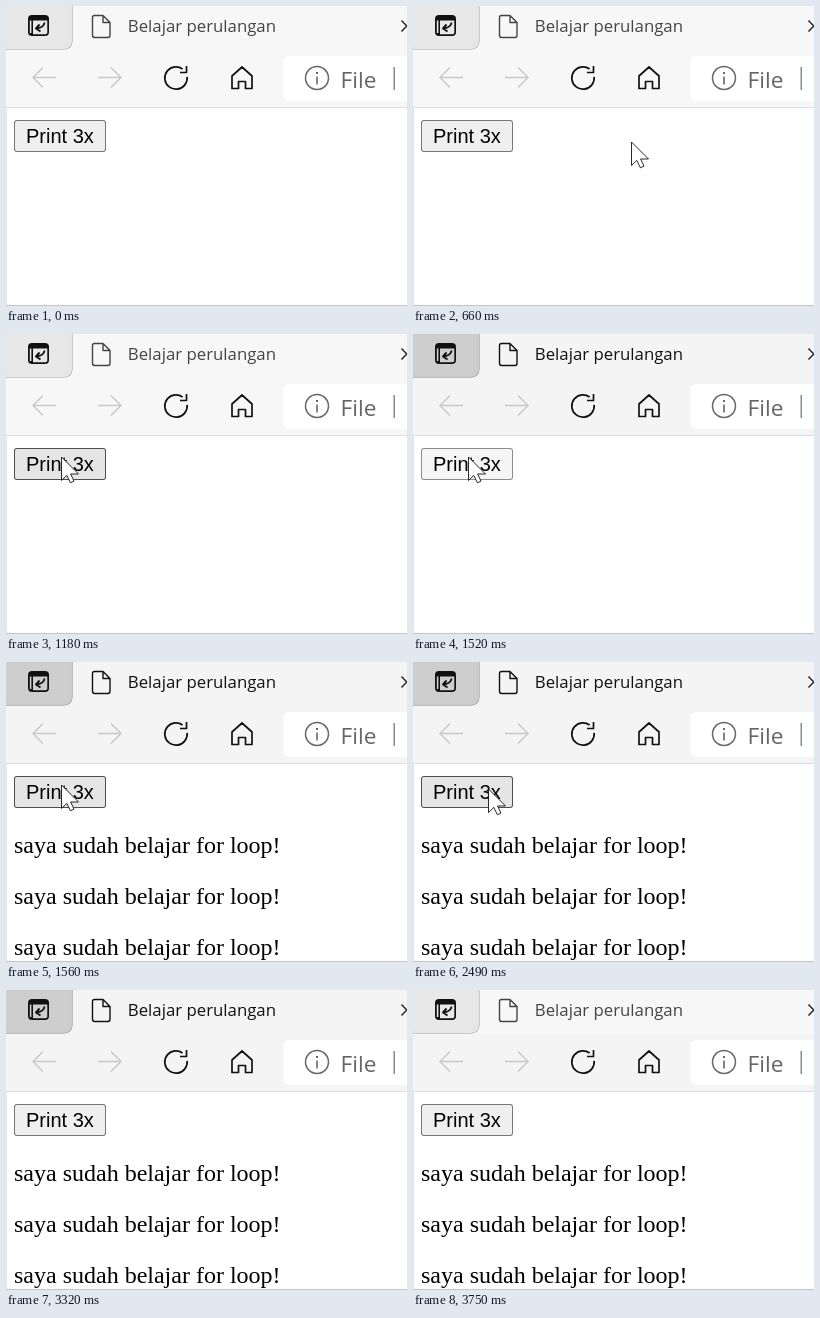
Write an HTML page with a canvas that moves like this. It is 401x300 px and loops after 3820 ms.

```html
<!DOCTYPE html>
<html lang="id">
<head>
<meta charset="utf-8">
<title>Belajar perulangan</title>
<style>
  html, body { margin: 0; width: 100%; height: 100%; overflow: hidden; background: #fff; }
  canvas { display: block; }
</style>
</head>
<body>
<canvas id="stage" width="401" height="300"></canvas>
<script>
const ctx = document.getElementById('stage').getContext('2d');
const LOOP = 3820;
const FOCUS = 1430, PRINT = 1560, BLUR = 3750, POINTER_GONE = 3320;
const UI_FONT = '"Open Sans", "Noto Sans", sans-serif';

// Pointer strokes: moves in discrete steps, each axis eased by its own power.
const GLIDES = [
  { start: 480, end: 990, steps: 9, from: [363, 146], to: [113, 132], power: [1.85, 3] },
  { start: 1060, end: 1180, steps: 3, from: [88, 129], to: [55, 122], power: [1.5, 1.2] },
  { start: 2490, end: 2750, steps: 5, from: [75, 126], to: [269, 166], power: [1.3, 1.3] },
  { start: 3130, end: 3260, steps: 3, from: [304, 159], to: [363, 268], power: [1, 0.7] }
];

function pointerAt(t) {
  const glide = GLIDES.findLast(g => g.start <= t);
  if (!glide || t >= POINTER_GONE) return null;
  const { start, end, steps, from, to, power } = glide;
  const last = steps - 1;
  const step = Math.min(last, Math.floor((t - start) / (end - start) * last + 0.25));
  const axis = k => Math.round(to[k] + (from[k] - to[k]) * (1 - step / last) ** power[k]);
  return { x: axis(0), y: axis(1) };
}

function rect(x, y, w, h, color) {
  ctx.fillStyle = color;
  ctx.fillRect(x, y, w, h);
}

function round(x, y, w, h, radii, color) {
  ctx.beginPath();
  ctx.roundRect(x, y, w, h, radii);
  ctx.fillStyle = color;
  ctx.fill();
}

function stroke(path, color, width) {
  ctx.strokeStyle = color;
  ctx.lineWidth = width;
  ctx.lineJoin = 'round';
  ctx.stroke(new Path2D(path));
}

function ring(x, y, radius, color, width, from = 0, to = 2 * Math.PI) {
  ctx.beginPath();
  ctx.arc(x, y, radius, from, to);
  ctx.strokeStyle = color;
  ctx.lineWidth = width;
  ctx.stroke();
}

function text(value, x, y, font, color) {
  ctx.font = font;
  ctx.fillStyle = color;
  ctx.fillText(value, x, y);
}

// Background strip, darkened along its inner edge by the active tab.
function drawStrip(color) {
  ctx.save();
  round(-10, -10, 76.5, 53.5, [0, 0, 8, 0], color);
  ctx.clip();
  ctx.shadowColor = 'rgba(0,0,0,0.35)';
  ctx.shadowBlur = 7;
  ctx.strokeStyle = 'rgba(0,0,0,0.3)';
  ctx.lineWidth = 1;
  ctx.stroke();
  ctx.restore();
}

function drawTabs(focused) {
  const ink = focused ? '#111' : '#444';
  rect(0, 0, 401, 44, focused ? '#f4f4f4' : '#f7f7f7');
  drawStrip(focused ? '#cecece' : '#e8e8e8');

  // Tab actions icon
  round(22, 9, 21, 21, 4, '#111');
  round(27, 14.5, 14.3, 13.8, [0, 0, 2, 0], focused ? '#cecece' : '#e8e8e8');
  rect(23.8, 14.5, 1.6, 12.5, focused ? '#cecece' : '#e8e8e8');
  stroke('M38.5 16.5Q38 21.5 30.5 22.5M33.5 18.5L30 22.5L34.5 25.5', '#111', 1.9);

  // Page icon
  stroke('M88.5 9.5H97L104 16.5V29Q104 31.5 102 31.5H88.5Q86.5 31.5 86.5 29V11.5Q86.5 9.5 88.5 9.5ZM97 9.5V16.5H104', ink, 1.4);
  text('Belajar perulangan', 121.8, 26, `16.8px ${UI_FONT}`, ink);
  stroke('M395.5 14.5L406 25.5M395.5 25.5L406 14.5', '#222', 1.5);
}

function drawToolbar(color) {
  rect(0, 44, 401, 57, color);
  rect(0, 101, 401, 1, '#dedede');

  stroke('M50 71.5H27M37 61.5L27 71.5L37 81.5', '#c8c8c8', 1.4);
  stroke('M92 71.5H115M105 61.5L115 71.5L105 81.5', '#c8c8c8', 1.4);

  // Reload and home
  ring(170, 72, 11.2, '#111', 1.7, -0.1, 1.7 * Math.PI);
  stroke('M180.5 60V66.5H174', '#111', 1.7);
  stroke('M226 70L236 61L246 70V82.5H239.5V75.5H232.5V82.5H226Z', '#111', 1.7);

  // Address field
  round(277.5, 50, 140, 45, 6, '#fff');
  ring(311, 72, 11.5, '#666', 1.5);
  rect(310.2, 70.5, 1.6, 8, '#666');
  rect(310, 66, 2, 2, '#666');
  text('File', 334.5, 82, `22.7px ${UI_FONT}`, '#666');
  rect(387.5, 61, 1.5, 23, '#8a8a8a');
}

function drawButton(hover, pressed) {
  const fill = pressed ? '#f5f5f5' : hover ? '#e5e5e5' : '#efefef';
  const border = pressed ? '#8d8d8d' : hover ? '#4f4f4f' : '#767676';
  round(8, 114, 92, 32, 3, border);
  round(9, 115, 90, 30, 2, fill);
  text('Print 3x', 20, 137, '20px Arial, "Liberation Sans", sans-serif', '#000');
}

function drawPage(printed, hover, pressed) {
  rect(0, 102, 401, 198, '#fff');
  rect(0, 102, 1, 197, '#e6e6e6');
  drawButton(hover, pressed);
  for (let i = 0; printed && i < 3; i++) {
    text('saya sudah belajar for loop!', 8, 191 + 51 * i,
      '24px "Times New Roman", "Liberation Serif", serif', '#000');
  }
  rect(0, 299, 401, 1, '#c4c4c4');
}

function drawPointer({ x, y }) {
  const arrow = new Path2D('M.5 1V24.5L5.8 19.4L9.4 26.8L13 25.1L9.6 18H17.5Z');
  ctx.save();
  ctx.translate(x, y);
  ctx.fillStyle = '#fff';
  ctx.fill(arrow);
  ctx.strokeStyle = '#111';
  ctx.lineWidth = 0.9;
  ctx.lineJoin = 'miter';
  ctx.stroke(arrow);
  ctx.restore();
}

function render(t) {
  const pointer = pointerAt(t);
  const hover = !!pointer && pointer.x < 100 && pointer.y < 146;
  drawTabs(t >= FOCUS && t < BLUR);
  drawToolbar(t >= FOCUS ? '#f4f4f4' : '#f7f7f7');
  drawPage(t >= PRINT, hover, t >= FOCUS && t < PRINT);
  if (pointer) drawPointer(pointer);
}

const start = performance.now();
function tick() {
  render((performance.now() - start) % LOOP);
  requestAnimationFrame(tick);
}
tick();
</script>
</body>
</html>
```
